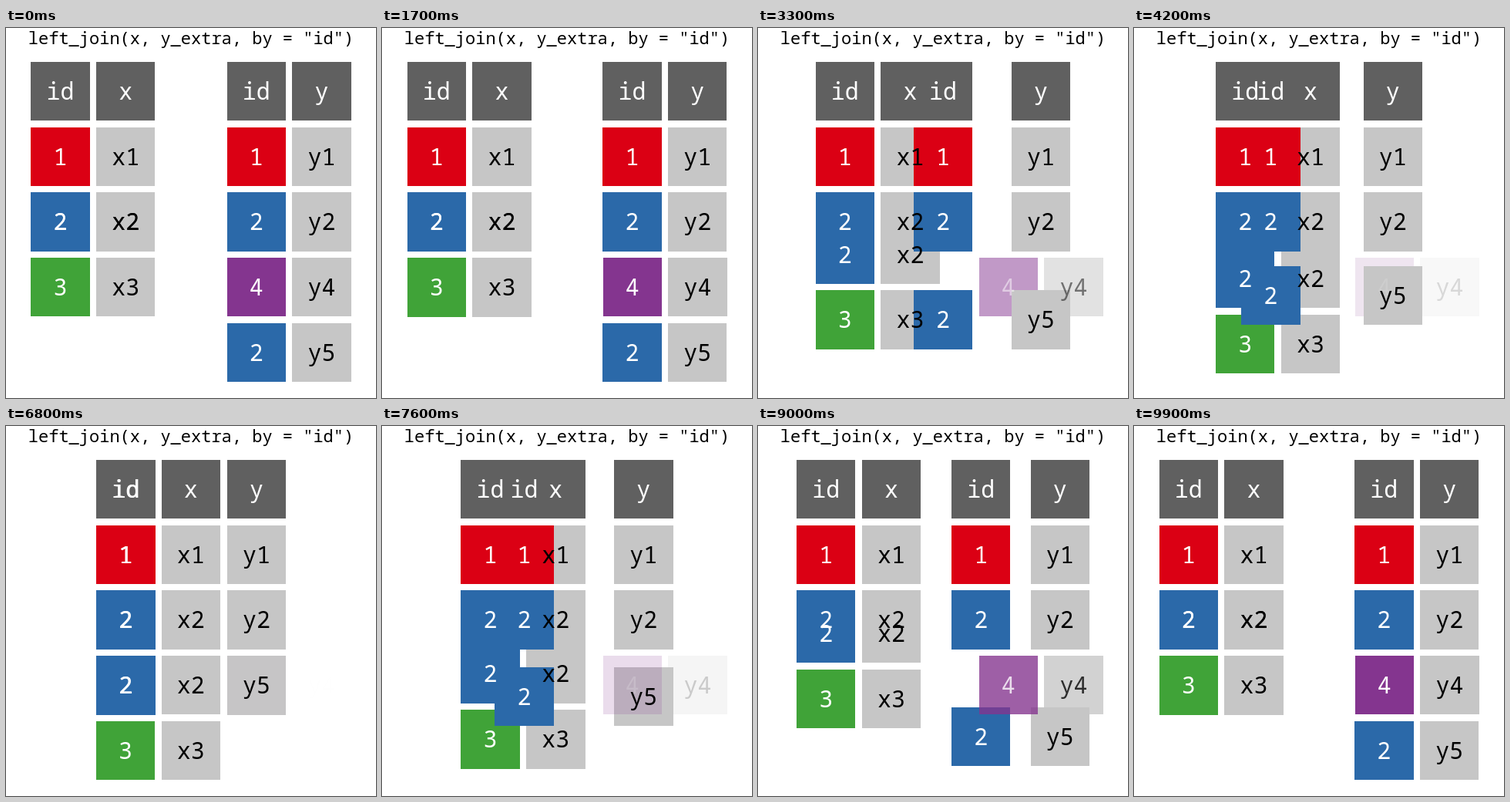
Recreate the animation shown at these times as an HTML page with a canvas. Size 480x480 px, loop 10 s.

```html
<!DOCTYPE html>
<html lang="en">
<head>
<meta charset="utf-8">
<title>Left join</title>
<style>
  html, body { margin: 0; width: 100%; height: 100%; overflow: hidden; background: #fff; }
  canvas { display: block; }
</style>
</head>
<body>
<canvas id="stage" width="480" height="480"></canvas>
<script>
const ctx = document.getElementById('stage').getContext('2d');

const LOOP = 10000, STEP = 100;
const PITCH = 84.75, SIZE = PITCH * 0.9, LEFT = 32.36, TOP = 43.86;
const FONT = '"Fira Mono", "Noto Sans Mono", "DejaVu Sans Mono", monospace';
const HEAD = '#606060', GREY = '#c6c6c6';
const KEYS = { 1: '#db0014', 2: '#2b69a9', 3: '#40a338', 4: '#84358f' };

// Two cells of one table row; columns and rows are [start, end] grid positions.
function row(key, value, cols, rows, fades = false) {
  const head = key === 'id';
  return [
    { text: key, fill: head ? HEAD : KEYS[key], ink: '#fff', col: cols[0], row: rows, fades },
    { text: value, fill: head ? HEAD : GREY, ink: head ? '#fff' : '#000', col: cols[1], row: rows, fades }
  ];
}

const X = [[0, 1], [1, 2]];
const Y = [[3, 1], [4, 3]];
const STAY = [[3, 3], [4, 4]];

const xRows = [
  row('id', 'x', X, [0, 0]),
  row('1', 'x1', X, [1, 1]),
  row('2', 'x2', X, [2, 2]),
  row('2', 'x2', X, [2, 3]),
  row('3', 'x3', X, [3, 4])
].flat();

const yRows = [
  row('id', 'y', Y, [0, 0]),
  row('1', 'y1', Y, [1, 1]),
  row('2', 'y2', Y, [2, 2]),
  row('2', 'y5', Y, [4, 3])
].flat();

const unmatched = row('4', 'y4', STAY, [3, 3], true);

// The unmatched row leaves beneath the others and returns on top of them.
const leaving = [...xRows, ...unmatched, ...yRows];
const returning = [...xRows, ...yRows, ...unmatched];

const lerp = ([a, b], p) => a + (b - a) * p;

function ease(time, start, end) {
  const t = Math.min(1, Math.max(0, (time - start) / (end - start)));
  return (1 - Math.cos(Math.PI * t)) / 2;
}

function drawTile(cell, p) {
  const x = LEFT + PITCH * lerp(cell.col, p);
  const y = TOP + PITCH * lerp(cell.row, p);
  const x0 = Math.round(x), y0 = Math.round(y);
  ctx.globalAlpha = cell.fades ? 1 - p : 1;
  ctx.fillStyle = cell.fill;
  ctx.fillRect(x0, y0, Math.round(x + SIZE) - x0, Math.round(y + SIZE) - y0);
}

function drawLabel(cell, p) {
  const x = LEFT + PITCH * lerp(cell.col, p) + SIZE / 2;
  const y = TOP + PITCH * lerp(cell.row, p) + SIZE / 2;
  ctx.globalAlpha = cell.fades ? 1 - p : 1;
  ctx.fillStyle = cell.ink;
  ctx.fillText(cell.text, x, y + 10.8);
}

function draw(time) {
  const p = time < 5800 ? ease(time, 1600, 5000) : 1 - ease(time, 6700, LOOP);
  const cells = time < 5800 ? leaving : returning;

  ctx.globalAlpha = 1;
  ctx.fillStyle = '#fff';
  ctx.fillRect(0, 0, 480, 480);

  ctx.textAlign = 'center';
  ctx.textBaseline = 'alphabetic';
  ctx.fillStyle = '#000';
  ctx.font = '22px ' + FONT;
  ctx.fillText('left_join(x, y_extra, by = "id")', 240, 21);

  ctx.font = '30px ' + FONT;
  cells.forEach(cell => drawTile(cell, p));
  cells.forEach(cell => drawLabel(cell, p));
}

const begin = performance.now();

function tick() {
  const time = (performance.now() - begin) % LOOP;
  draw(Math.floor(time / STEP) * STEP);
  requestAnimationFrame(tick);
}

tick();
</script>
</body>
</html>
```
